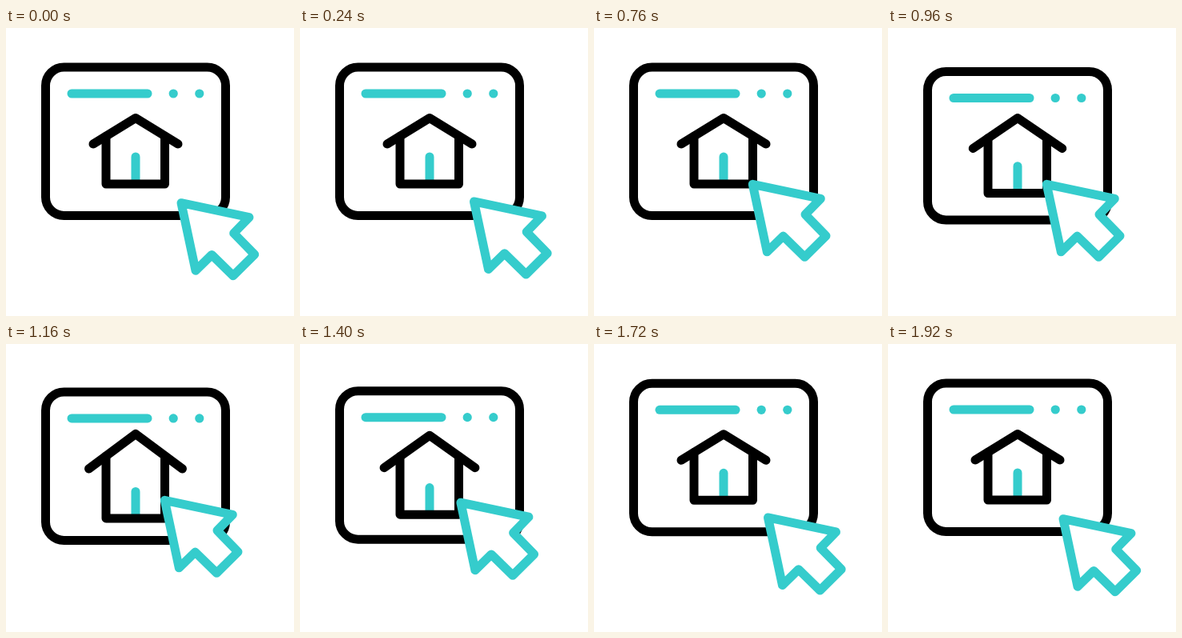
These frames come from a looping animation (360 px wide and 360 px high, 2 s). An HTML page with a canvas:

```html
<!DOCTYPE html>
<html lang="en">
<head>
<meta charset="utf-8">
<title>Home page click</title>
<style>
  html, body { margin: 0; width: 100%; height: 100%; overflow: hidden; background: #fff; }
  canvas { display: block; width: 360px; height: 360px; }
</style>
</head>
<body>
<canvas id="stage"></canvas>
<script>
const LOOP = 2000, STEP = 40, SIZE = 360;
const BLACK = '#000', TEAL = '#35cccc';

const canvas = document.getElementById('stage');
const ratio = window.devicePixelRatio || 1;
canvas.width = canvas.height = SIZE * ratio;
const ctx = canvas.getContext('2d');
ctx.scale(ratio, ratio);
ctx.lineCap = ctx.lineJoin = 'round';

const ease = p => p < 0.5 ? 4 * p ** 3 : 1 - 4 * (1 - p) ** 3;
const ramp = (t, a, b) => ease(Math.min(1, Math.max(0, (t - a) / (b - a))));
// Rises from a to b, falls back from c to d
const pulse = (t, a, b, c, d) => ramp(t, a, b) - ramp(t, c, d);

function path(points, color, width, closed) {
  ctx.beginPath();
  points.forEach(([x, y]) => ctx.lineTo(x, y));
  if (closed) {
    ctx.closePath();
    ctx.fillStyle = '#fff';
    ctx.fill();
  }
  ctx.strokeStyle = color;
  ctx.lineWidth = width;
  ctx.stroke();
}

function dot(x, y) {
  ctx.beginPath();
  ctx.arc(x, y, 5.6, 0, Math.PI * 2);
  ctx.fillStyle = TEAL;
  ctx.fill();
}

function drawWindow() {
  ctx.beginPath();
  ctx.roundRect(49.5, 49, 225, 185.5, 23);
  ctx.strokeStyle = BLACK;
  ctx.lineWidth = 11;
  ctx.stroke();
  path([[82, 82], [177, 82]], TEAL, 11);
  dot(209.2, 82);
  dot(241.8, 82);
}

function drawHouse(grow) {
  const mid = 162, apex = 112.5 - 11 * grow;
  const half = 53 + 5.5 * grow, eave = 145;
  const floor = 195 + 12 * grow;
  const left = 125, right = 198.5;
  const wallTop = apex + (eave - apex) * (mid - left) / half;
  path([[mid, 161 + 12.5 * grow], [mid, floor - 5]], TEAL, 11);
  path([[left, wallTop], [left, floor], [right, floor], [right, wallTop]], BLACK, 11);
  path([[mid - half, eave], [mid, apex], [mid + half, eave]], BLACK, 11);
}

const arrow = [[0, 0], [85, 18], [65.7, 37.8], [91.7, 64.5], [65, 91], [38.2, 64.8], [18, 84.5]];

function draw(t) {
  const reach = pulse(t, 40, 800, 1160, 1920);
  const drop = pulse(t, 720, 1200, 1200, 1840);
  const grow = pulse(t, 720, 1200, 1200, 1680);

  ctx.fillStyle = '#fff';
  ctx.fillRect(0, 0, SIZE, SIZE);

  ctx.save();
  ctx.translate(0, 11 * drop);
  drawWindow();
  drawHouse(grow);
  ctx.restore();

  ctx.save();
  ctx.translate(219 - 20.7 * reach, 218.7 - 23.4 * reach);
  path(arrow, TEAL, 11, true);
  ctx.restore();
}

const start = performance.now();
function tick() {
  const t = (performance.now() - start) % LOOP;
  draw(Math.floor(t / STEP) * STEP);
  requestAnimationFrame(tick);
}
tick();
</script>
</body>
</html>
```
